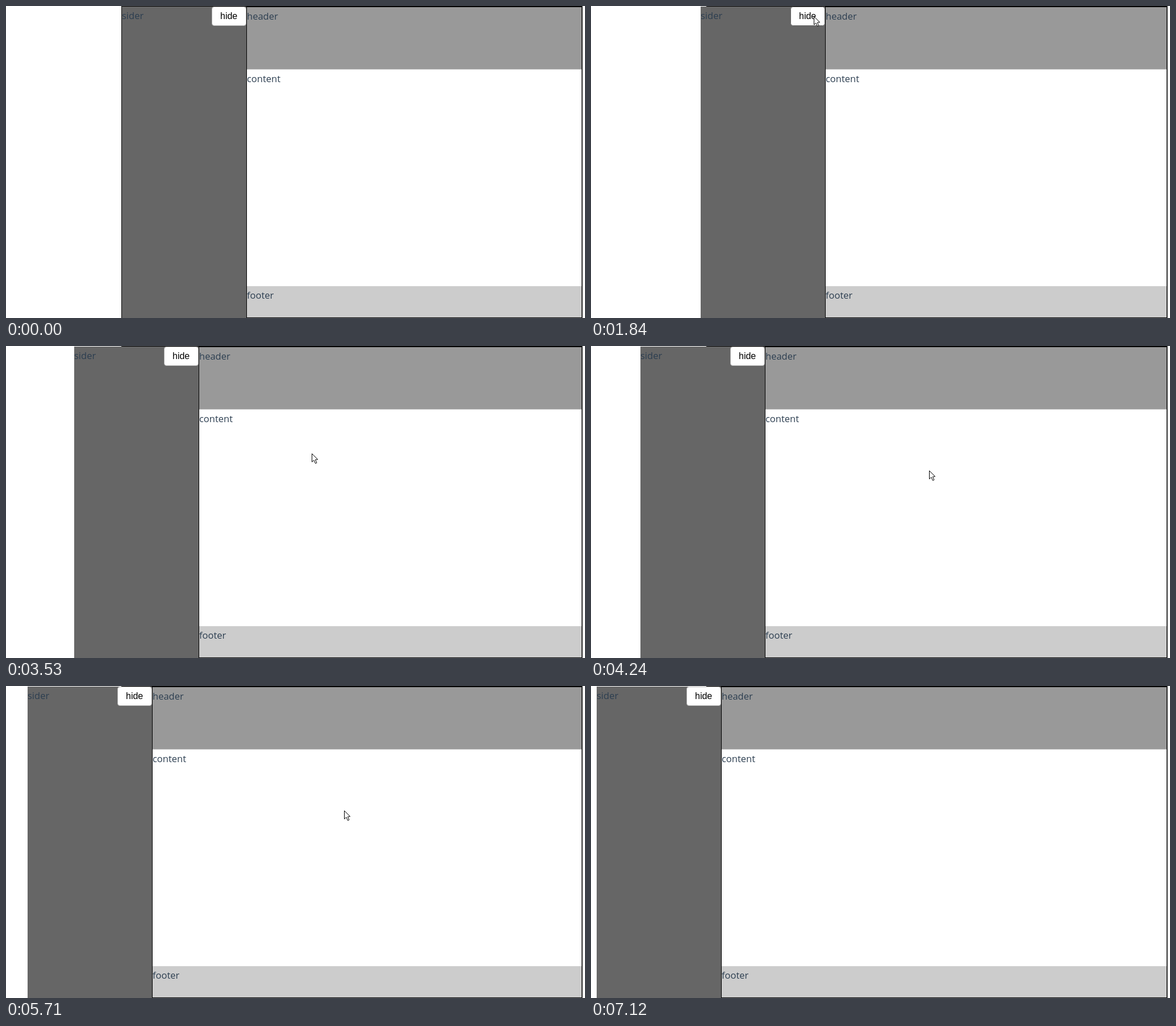
Write an HTML page with a canvas that moves like this. It is 1019 by 549 pixels and loops after 7.19 s.

```html
<!DOCTYPE html>
<html lang="en">
<head>
<meta charset="utf-8">
<title>Sliding sider</title>
<style>
  html, body { margin: 0; width: 100%; height: 100%; overflow: hidden; background: #fff; }
  canvas { display: block; }
</style>
</head>
<body>
<canvas id="stage" width="1019" height="549"></canvas>
<script>
const ctx = document.getElementById('stage').getContext('2d');
const W = 1019, H = 549, LOOP = 7190;

const SLIDE = { from: 204, distance: 220.3, start: 1160, duration: 10000 };
const SIDER_W = 219;
const RIGHT = 1013;

const ENTRY = { x: 822, y: 494 };
const MOVES = [
  { start: 210, time: 490, x: 392, y: 18 },
  { start: 1950, time: 250, x: 538, y: 189 },
  { start: 4080, time: 150, x: 595, y: 219 },
  { start: 6230, time: 226, x: 952, y: 388 }
];
const EXIT_TIME = 6460;

const ARROW = new Path2D('M0 0V14.5L3.4 11.4L6 17.2L8.4 16.1L5.9 10.5L10.2 10.2Z');

const TEXT_FONT = '16.5px "Open Sans", "Noto Sans", sans-serif';
const BUTTON_FONT = '16px "Liberation Sans", Arial, sans-serif';

const clamp = v => Math.min(1, Math.max(0, v));
const smooth = v => v * v * (3 - 2 * v);
const bezier = (u, a, b) => 3 * a * u * (1 - u) ** 2 + 3 * b * u * u * (1 - u) + u ** 3;

// CSS "ease": cubic-bezier(.25, .1, .25, 1)
function ease(v) {
  let lo = 0, hi = 1;
  for (let i = 0; i < 24; i++) {
    const mid = (lo + hi) / 2;
    if (bezier(mid, 0.25, 0.25) < v) lo = mid; else hi = mid;
  }
  return bezier(lo, 0.1, 1);
}

function pointerAt(t) {
  if (t < MOVES[0].start || t >= EXIT_TIME) return null;
  let { x, y } = ENTRY;
  for (const m of MOVES) {
    const k = smooth(clamp((t - m.start) / m.time));
    x += (m.x - x) * k;
    y += (m.y - y) * k;
  }
  return { x: Math.round(x), y: Math.round(y) };
}

function rect(color, x, y, w, h) {
  ctx.fillStyle = color;
  ctx.fillRect(x, y, w, h);
}

function label(text, x, y, font = TEXT_FONT, color = '#2c3e50') {
  ctx.font = font;
  ctx.fillStyle = color;
  ctx.fillText(text, x, y);
}

function outlined(path, stroke) {
  ctx.fillStyle = '#fff';
  ctx.fill(path);
  ctx.strokeStyle = stroke;
  ctx.stroke(path);
}

function drawButton(x, hover) {
  const box = new Path2D();
  box.roundRect(x + 0.5, 1.5, 60, 33, 4);
  outlined(box, hover ? '#666' : '#b0b0b0');
  label('hide', x + 15, 23, BUTTON_FONT, '#000');
}

function drawPointer({ x, y }) {
  ctx.save();
  ctx.translate(x + 0.5, y + 0.5);
  outlined(ARROW, '#000');
  ctx.restore();
}

function draw(t) {
  const progress = ease(clamp((t - SLIDE.start) / SLIDE.duration));
  const x = Math.round(SLIDE.from - SLIDE.distance * progress);
  const main = x + SIDER_W;
  const inner = main + 1;
  const innerW = RIGHT - inner;
  const button = x + 158;
  const pointer = pointerAt(t);

  rect('#fff', 0, 0, W, H);

  // wrapper border
  rect('#000', 203, 0, 811, 1);
  rect('#000', 203, 0, 1, H);
  rect('#000', RIGHT + 1, 0, 0.6, H);

  rect('#666', x, 1, SIDER_W, H - 1);
  label('sider', x, 23);

  rect('#000', main, 1, innerW + 2, H - 1);
  rect('#fff', inner, 2, innerW, 546);
  rect('#999', inner, 2, innerW, 109.5);
  rect('#ccc', inner, 493, innerW, 55);
  label('header', inner, 24);
  label('content', inner, 134);
  label('footer', inner, 515);

  const hover = pointer && pointer.y < 35 && pointer.x >= button && pointer.x < button + 61;
  drawButton(button, hover);
  if (pointer) drawPointer(pointer);
}

function tick() {
  draw(performance.now() % LOOP);
  requestAnimationFrame(tick);
}
tick();
</script>
</body>
</html>
```
